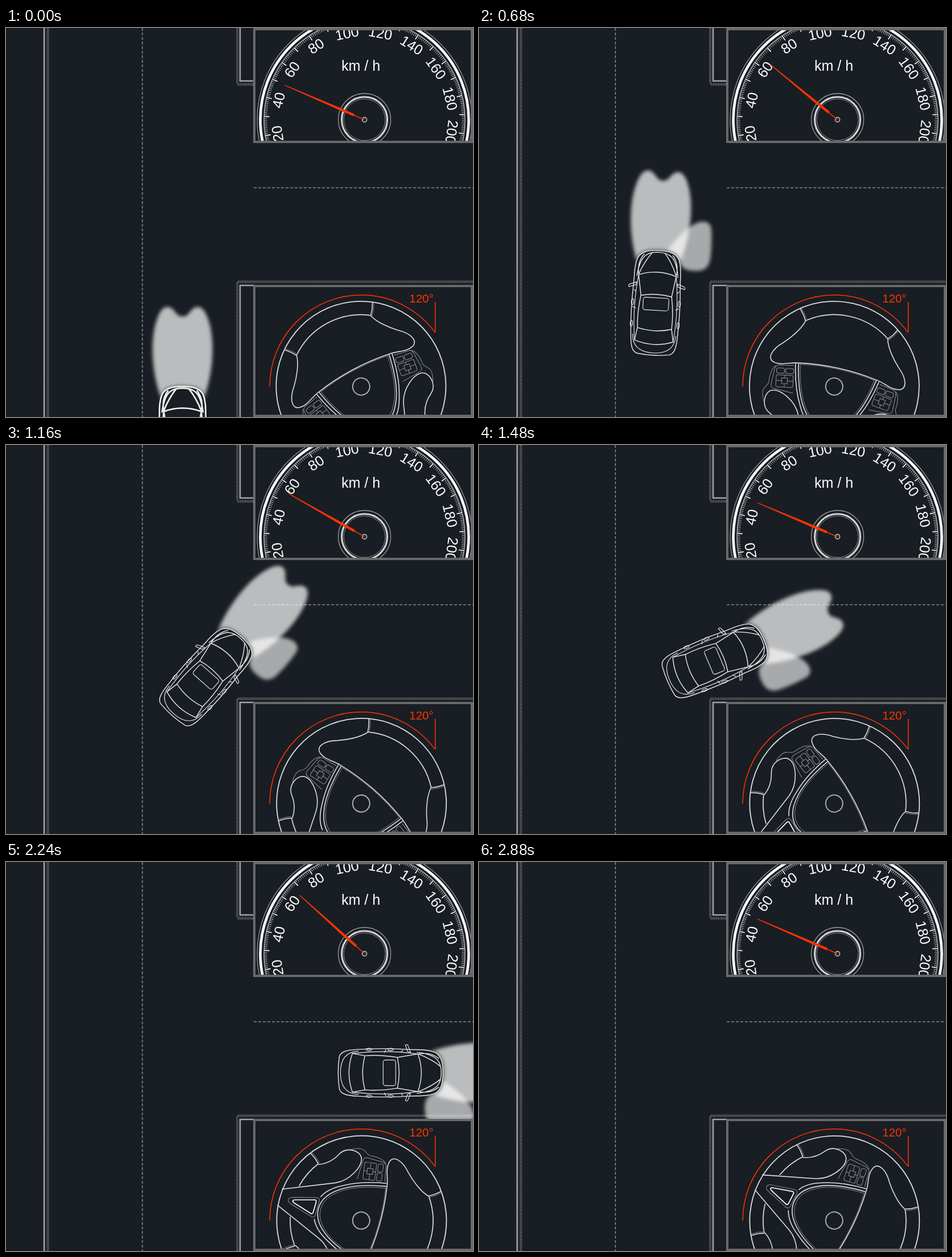
Animation, 820 px wide and 683 px high, one loop 2.92 s. Source, as an HTML page with a canvas:

```html
<!DOCTYPE html>
<html lang="en">
<head>
<meta charset="utf-8">
<title>Cornering light</title>
<style>
html, body { margin: 0; width: 100%; height: 100%; overflow: hidden; background: #191e24; }
canvas { display: block; width: 820px; height: 683px; }
</style>
</head>
<body>
<canvas id="stage" width="820" height="683"></canvas>
<script>
const ctx = document.getElementById('stage').getContext('2d');
const LOOP = 2920, STEP = 40;
const BG = '#191e24', RED = '#ff3300', FRAME = '#696969';
const FONT = '"Liberation Sans", Arial, sans-serif';

const rad = d => d * Math.PI / 180;
const clamp = (v, lo, hi) => Math.max(lo, Math.min(hi, v));
const lerp = (a, b, u) => a + (b - a) * u;

// Straight in, quarter turn at constant rate, straight out
const TURN = { from: 640, to: 1767, start: [310, 491], bend: [316, 372], end: [495.5, 368.7] };

function carPose(t) {
  const u = clamp((t - TURN.from) / (TURN.to - TURN.from), 0, 1);
  const [x, y] = [0, 1].map(i => lerp(lerp(TURN.start[i], TURN.bend[i], u), lerp(TURN.bend[i], TURN.end[i], u), u));
  const before = Math.max(0, TURN.from - t), after = Math.max(0, t - TURN.to);
  return { x: x + 0.38 * after, y: y + 0.36 * before + 0.003 * after, angle: rad(90 * u) };
}

const wheelAngle = t => rad(-28.4 + 0.06 * Math.min(t, 2420));

// Speed rises and falls at steady rates between turning points
const SPEED = [[0, 23.4], [450, 44.1], [1758, 17.3], [2180, 43.8], [LOOP, 22.3]];

function needleAngle(t) {
  const i = SPEED.findIndex(key => key[0] > t);
  const [t0, a] = SPEED[i - 1], [t1, b] = SPEED[i];
  return rad(lerp(a, b, (t - t0) / (t1 - t0)));
}

// A half shape together with its mirror image
function both(d) {
  const half = new Path2D(d), path = new Path2D();
  path.addPath(half);
  path.addPath(half, new DOMMatrix([-1, 0, 0, 1, 0, 0]));
  return path;
}

function stroke(path, color, width) {
  ctx.strokeStyle = color;
  ctx.lineWidth = width;
  ctx.stroke(path);
}

function line(color, width, ...p) {
  const path = new Path2D();
  for (let i = 0; i < p.length; i += 2) path.lineTo(p[i], p[i + 1]);
  stroke(path, color, width);
}

function ring(color, width, r, from = 0, to = 360) {
  const path = new Path2D();
  path.arc(0, 0, r, rad(from), rad(to));
  stroke(path, color, width);
}

function dashed(dash, ...args) {
  ctx.setLineDash(dash);
  line(...args);
  ctx.setLineDash([]);
}

function drawRoad() {
  const edge = '#a2a3a5', mark = '#85878a', ticks = [1, 1.6], dash = [5, 3];
  line(edge, 2.6, 67, 0, 67, 683);
  dashed(ticks, mark, 4.5, 73.5, 0, 73.5, 683);
  dashed(dash, mark, 1.6, 239.5, 0, 239.5, 683);
  dashed(dash, mark, 1.6, 435, 280.5, 820, 280.5);
  line(edge, 2.6, 411, 0, 411, 93, 436, 93);
  line(edge, 2.6, 411, 683, 411, 452, 436, 452);
  dashed(ticks, mark, 4, 406, 0, 406, 97);
  dashed(ticks, mark, 4, 406, 447, 406, 683);
  dashed(ticks, mark, 4.5, 407, 99, 436, 99);
  dashed(ticks, mark, 4.5, 407, 445.5, 820, 445.5);
}

// Car shapes: nose at the origin, pointing up
const beam = both('M0 22V-123Q7-122 13-131C23-144 35-143 43-123C58-88 55-25 37 22Z');
const corner = new Path2D('M12 2C28-20 40-38 58-49C74-59 88-57 90-42Q93-15 91 9C89 27 80 32 62 32C46 32 36 24 12 2Z');
const body = both('M0 0C18 0 30 3 36 14C42 28 40 45 41 60Q44 105 41 150C40 172 36 180 28 182Q14 184 0 184');
const cabin = both('M0 38Q17 38 33 44L27 80Q14 77 0 77M27 80Q32 110 30 137Q15 141 0 141M30 137L34 159Q17 165 0 165');
const hood = both('M33 43Q24 20 11 4M33 43Q37 22 25 7M0 3C18 3 32 8 36 46');
const sides = both('M33 44Q41 100 34 159M36 74L40 70M35 103L41 100M38 148Q37 180 0 180');
const mirrors = both('M36 57L47 61Q51 63 49 66L37 62Z');
const sunroof = new Path2D();
sunroof.roundRect(-22.5, 83, 45, 22, 4);
const handles = new Path2D();
for (const x of [-41, 41]) {
  for (const y of [92, 130]) {
    handles.moveTo(x + 2, y);
    handles.ellipse(x, y, 2, 5, 0, 0, 7);
  }
}

function drawCar(t) {
  const { x, y, angle } = carPose(t);
  ctx.save();
  ctx.translate(x, y);
  ctx.rotate(angle);
  ctx.translate(0, -92);

  ctx.save();
  ctx.filter = 'blur(3.2px)';
  ctx.fillStyle = 'rgba(255,255,255,0.7)';
  ctx.fill(beam);
  ctx.fillStyle = `rgba(255,255,255,${0.62 * clamp(t / 240, 0, 1)})`;
  ctx.fill(corner);
  ctx.restore();

  ctx.save();
  ctx.shadowColor = BG;
  ctx.shadowBlur = 7;
  ctx.fillStyle = BG;
  ctx.fill(body);
  ctx.restore();

  const ink = '#ececec', width = lerp(2.7, 1.4, clamp(t / 120, 0, 1));
  for (const p of [body, cabin, hood]) stroke(p, ink, width);
  for (const p of [sides, mirrors, sunroof, handles]) stroke(p, ink, width * 0.8);
  ctx.restore();
}

function panel(y, h) {
  ctx.fillStyle = BG;
  ctx.fillRect(434, y, 386, h);
  ctx.strokeStyle = FRAME;
  ctx.lineWidth = 4;
  ctx.strokeRect(436, y + 2, 382, h - 4);
  ctx.beginPath();
  ctx.rect(438, y + 4, 378, h - 8);
  ctx.clip();
}

const needle = new Path2D('M-20-2.2L-48-2.1L-153-.6V.6L-48 2.1L-20 2.2Z');

function drawGauge(t) {
  ctx.save();
  panel(0, 202);
  ctx.fillStyle = '#fff';
  ctx.textAlign = 'center';
  ctx.font = '25px ' + FONT;
  ctx.fillText('km / h', 623, 75);
  ctx.translate(629.5, 161);
  ring('#8d8f92', 1.3, 188.5);
  ring('#fff', 4.5, 183);
  ring('#c8c8c8', 1.2, 176.5);

  for (let v = 10; v <= 210; v++) {
    const major = v % 10 === 0;
    ctx.save();
    ctx.rotate(rad(12.8 + (v - 40) * 1.095 - 90));
    line(major ? '#fff' : '#c4c5c6', major ? 1.6 : 0.9, 0, major ? -167 : -171, 0, -176);
    if (v % 20 === 0 && v <= 200) ctx.fillText(v, 0, -146);
    ctx.restore();
  }

  ring('#9a9b9d', 1.3, 46);
  ring('#d2d2d2', 3.2, 40);
  ring('#8d8f92', 1, 36.5);
  ring('#aaa', 1.8, 4);
  ctx.rotate(needleAngle(t));
  line(RED, 1.6, 0, 0, -22, 0);
  ctx.fillStyle = RED;
  ctx.fill(needle);
  ctx.restore();
}

// Wheel shapes: hub at the origin, straight ahead
const upperGap = both('M74-101C78-86 92-68 104-56C122-40 126-22 112-19C98-16 88-24 71-27');
const lowerGap = both('M74 99C80 84 92 74 102 69C118 60 118 36 106 30C92 24 62 38 51 62L14.5 149');
const horn = both('M0-33Q36-33 70-27C64 5 55 35 39 55Q22 78 0 78');
const divider = both('M75-25C70 2 63 25 51 46Q38 72 20 80');
const pad = both('M77-21L103-16Q108-15 109-8V21Q108 26 102 26L68 27M108-14Q116-6 114 14Q113 20 119 27Q124 36 115 52');
const badge = both('M0 85H9Q14 85 12 90L3 121Q2 125 0 125');
const badgeRim = both('M0 80H12Q19 80 17 88L6 127Q4 133 0 133');

const buttons = new Path2D('M-15 4H-5M5 4H15M0-6V-1M0 9V15');
buttons.roundRect(-15, -18, 14, 9, 3);
buttons.roundRect(1, -18, 14, 9, 3);
buttons.roundRect(-15, -6, 30, 21, 3);
buttons.rect(-5, -1, 10, 10);

function drawWheel(t) {
  ctx.save();
  panel(451, 232);
  ctx.fillStyle = RED;
  ctx.font = '20.5px ' + FONT;
  ctx.textAlign = 'left';
  ctx.fillText('120°', 708.3, 482);
  line(RED, 1.5, 753.7, 481, 753.7, 534.5);
  ctx.translate(623.7, 629.5);
  ring(RED, 1.5, 160.7, 180, 323.6);

  ctx.rotate(wheelAngle(t));
  const ink = '#dedede', thin = '#8f9194';
  ctx.save();
  ctx.translate(0, -0.7);
  ring(ink, 1.8, 149);
  ring(ink, 1.7, 125.5, -126.3, -53.7);
  ring(ink, 1.7, 125.5, 53, 77);
  ring(ink, 1.7, 125.5, 103, 127);
  ctx.restore();
  for (const p of [upperGap, lowerGap, divider, horn]) stroke(p, ink, 1.6);
  stroke(pad, thin, 1);

  for (const side of [-1, 1]) {
    ctx.save();
    ctx.scale(side, 1);
    ctx.translate(88, 5);
    ctx.rotate(rad(8.7));
    stroke(buttons, thin, 1);
    ctx.restore();
    for (const deg of [36, 143]) {
      ctx.save();
      ctx.rotate(rad(side * deg));
      line(ink, 1.6, 0, -125, 1, -137, 0, -149);
      line(thin, 0.9, 2.5, -125, 3.5, -137, 2.5, -149);
      ctx.restore();
    }
  }

  ctx.save();
  ctx.scale(0.95, 0.95);
  stroke(horn, thin, 0.9);
  ctx.restore();
  stroke(badge, '#fff', 1.7);
  stroke(badgeRim, thin, 1);
  ring('#b9babb', 1.8, 15);
  ctx.restore();
}

function render(t) {
  ctx.fillStyle = BG;
  ctx.fillRect(0, 0, 820, 683);
  drawRoad();
  drawCar(t);
  drawGauge(t);
  drawWheel(t);
}

const start = performance.now();
function tick() {
  const t = (performance.now() - start) % LOOP;
  render(Math.floor(t / STEP) * STEP);
  requestAnimationFrame(tick);
}
tick();
</script>
</body>
</html>
```
